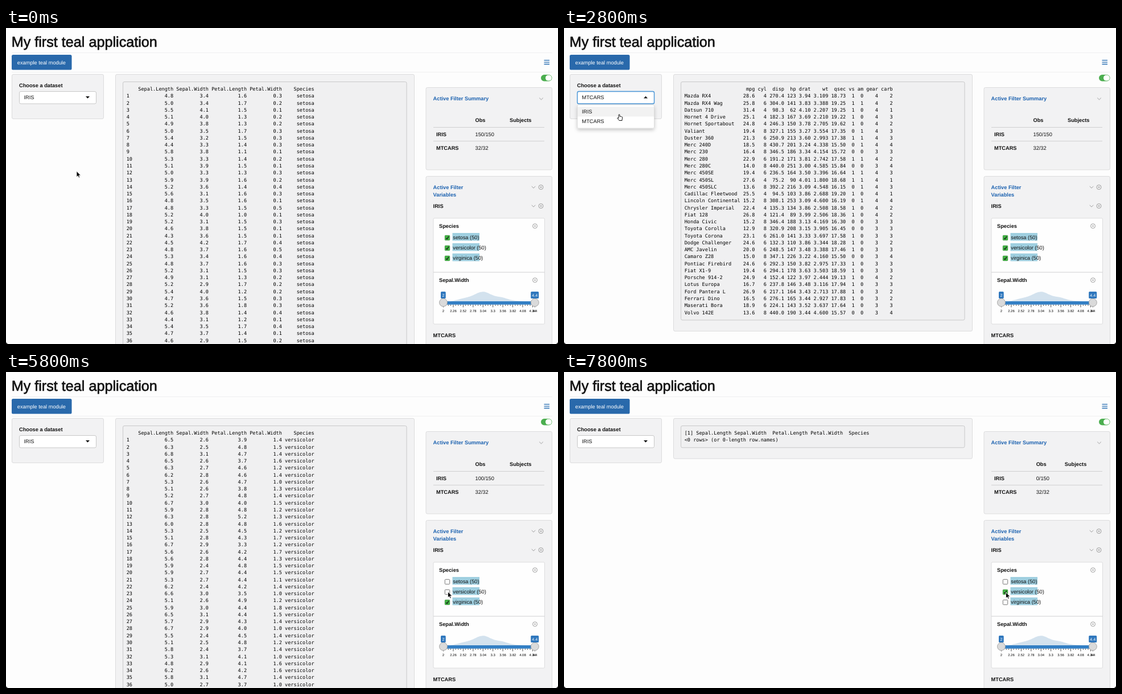
Animation of 970 by 555 pixels, one loop 8000 ms. Source, as an HTML page:

```html
<!DOCTYPE html>
<html lang="en">
<head>
<meta charset="utf-8">
<title>My first teal application</title>
<style>
html, body { margin: 0; width: 100%; height: 100%; overflow: hidden; background: #fdfdfd; }
svg { display: block; width: 970px; height: 555px; }
text { font: 9.24px "Liberation Sans", Arial, sans-serif; fill: #111; white-space: pre; text-rendering: geometricPrecision; }
.title { font-size: 25.2px; stroke: #111; stroke-width: .65px; }
.bold { font-weight: bold; }
.blue { font-weight: bold; fill: #1c62b0; }
.white { fill: #fff; }
.mono text { font: 8.577px "DejaVu Sans Mono", monospace; fill: #000; }
.scale text { font-size: 5.94px; text-anchor: middle; fill: #000; }
.bubble text { font-size: 7px; text-anchor: middle; fill: #fff; }
.panel { fill: #f2f2f3; stroke: #dcdcdd; }
.rule { stroke: #d0d0d1; }
.icon { fill: none; stroke: #888; stroke-width: .8; }
</style>
</head>
<body>
<svg viewBox="0 0 970 555">
  <defs>
    <path id="chevron" class="icon" d="M-3.3-1.6 0 1.6 3.3-1.6"/>
    <g id="close" class="icon"><circle r="4"/><path d="M-1.5-1.5 1.5 1.5M1.5-1.5-1.5 1.5"/></g>
    <filter id="shadow" x="-10%" y="-20%" width="120%" height="150%">
      <feDropShadow dx="0" dy="3" stdDeviation="3" flood-opacity=".22"/>
    </filter>
  </defs>
  <rect width="970" height="555" fill="#fdfdfd"/>
  <text class="title" x="9.7" y="32.6">My first teal application</text>
  <path d="M10 43.5H960M10 77.5H960" stroke="#efeff0"/>
  <rect x="10" y="47" width="105.5" height="26.5" rx="2.6" fill="#2969ab"/>
  <text class="white" x="19.8" y="63.8">example teal module</text>
  <path d="M945.5 56.7H955M945.5 60.1H955M945.5 63.5H955" stroke="#2069b0" stroke-width="1.3"/>

  <rect class="panel" x="10.5" y="81.5" width="161" height="78" rx="2.5"/>
  <text class="bold" x="23" y="104.2">Choose a dataset</text>
  <rect id="glow" x="22.5" y="110.5" width="137" height="23.5" rx="3.5" fill="#c3ddf3"/>
  <rect id="select" x="23.5" y="111.5" width="135" height="21.5" rx="2.5" fill="#fff"/>
  <text id="choice" x="31.5" y="125.2"></text>
  <path id="caret" fill="#111"/>

  <rect class="panel" id="outer" x="192.5" y="81.5" width="525" rx="2.5"/>
  <rect id="inner" x="205.5" y="94.5" width="498.5" rx="2.5" fill="#f0f0f1" stroke="#c8c8c9"/>
  <g class="mono" id="tables"></g>

  <g id="menu">
    <rect x="23.5" y="135" width="135" height="41" rx="2" fill="#fff" stroke="#d5d5d5" stroke-width=".7" filter="url(#shadow)"/>
    <rect id="hover" x="24" width="134" height="17" fill="#f2f2f2"/>
    <text x="31.5" y="150.2">IRIS</text>
    <text x="31.5" y="167.4">MTCARS</text>
  </g>

  <rect x="940" y="82" width="19.5" height="11.4" rx="5.7" fill="#4bae4f"/>
  <rect x="948" y="82.8" width="10.8" height="9.8" rx="4.9" fill="#fff"/>

  <rect class="panel" x="738" y="104.5" width="221.5" height="144.5" rx="2.5"/>
  <text class="blue" x="750.6" y="127.4">Active Filter Summary</text>
  <use href="#chevron" x="940.5" y="124.3"/>
  <path class="rule" d="M751 174.5H946M751 198.7H946"/>
  <text class="bold" id="obsHead" y="165.4">Obs</text>
  <text class="bold" id="subjHead" y="165.4">Subjects</text>
  <text class="bold" x="756" y="190">IRIS</text>
  <text id="irisObs" y="190"></text>
  <text class="bold" x="756" y="214.4">MTCARS</text>
  <text id="carObs" y="214.4">32/32</text>

  <rect class="panel" x="738" y="260.5" width="221.5" height="310" rx="2.5"/>
  <text class="blue" x="750.6" y="282.8">Active Filter</text>
  <text class="blue" x="750.6" y="296">Variables</text>
  <use href="#chevron" x="927" y="279.6"/><use href="#close" x="940" y="279.6"/>
  <text class="bold" x="750.6" y="315.6">IRIS</text>
  <use href="#chevron" x="927" y="312.6"/><use href="#close" x="940" y="312.6"/>
  <rect x="751" y="334" width="195.5" height="186" rx="2" fill="#fefefe" stroke="#dcdcdd"/>
  <path class="rule" d="M751 429H946.5"/>
  <text class="bold" x="761" y="350.8">Species</text>
  <use href="#close" x="929.5" y="347.8"/>
  <g id="species"></g>
  <text class="bold" x="761" y="445.8">Sepal.Width</text>
  <use href="#close" x="929.5" y="442.8"/>
  <path d="M769 481C788 480 792 477 804 474.5C822 471.5 828 463.5 838 463.3C848 463.5 851 470 866 472C880 474 884 478.5 900 479.3L929 481Z" fill="#d3e2ee"/>
  <rect x="766" y="480" width="164" height="5.8" fill="#337fc4"/>
  <path id="ticks" stroke="#222" stroke-width=".8"/>
  <g class="scale" id="scale"></g>
  <g fill="#dadada" stroke="#999" stroke-width=".8"><circle cx="768.5" cy="482.2" r="7"/><circle cx="929.3" cy="482.2" r="7"/></g>
  <g class="bubble" fill="#2f77bd">
    <rect x="764" y="463" width="8.7" height="12" rx="1.5"/><text x="768.4" y="471.7">2</text>
    <rect x="922.2" y="463" width="14" height="12" rx="1.5"/><text x="929.2" y="471.7">4.4</text>
  </g>
  <text class="bold" x="750.6" y="543.4">MTCARS</text>
  <path d="M0 551Q.5 554.5 4 555H0ZM970 551Q969.5 554.5 966 555H970Z"/>

  <g id="cursor" stroke-linejoin="round">
    <path id="arrow" d="M0 0V10.2L2.4 8.1 4 11.6 5.7 10.8 4.2 7.4H7.4Z" stroke="#fff" stroke-width=".8"/>
    <path id="hand" d="M-1 5.5V1Q0-.6 1 1V4Q2 3 2.7 4.2Q3.8 3.4 4.4 4.6Q5.8 4.2 5.7 6L5 9.5V11H0L-3.3 6.8Q-3.2 5.3-1 7Z" fill="#fff" stroke="#000" stroke-width=".9"/>
    <path id="beam" d="M-2.5-4.6Q0-4.6 0-3.2Q0-4.6 2.5-4.6M0-3.2V3.2M-2.5 4.6Q0 4.6 0 3.2Q0 4.6 2.5 4.6M-1.2 1.5H1.2" fill="none" stroke="#111" stroke-width=".9"/>
  </g>
</svg>
<script>
const LOOP = 8000, LINE = 12.263, ROWS = 36;
const $ = id => document.getElementById(id);
const set = (node, attrs) => { for (const k in attrs) node.setAttribute(k, attrs[k]); return node; };
const add = (parent, tag, attrs, content = '') => {
  const node = set(document.createElementNS('http://www.w3.org/2000/svg', tag), attrs);
  node.textContent = content;
  return parent.appendChild(node);
};
const show = (node, on) => { node.style.display = on ? '' : 'none'; };
const clamp = (v, lo, hi) => Math.min(hi, Math.max(lo, v));

let seed = 7;
const random = () => (seed = seed * 16807 % 2147483647) / 2147483647;
const normal = () => (random() + random() + random() - 1.5) * 2;

// Right-aligns every column to its widest cell, as R prints a data frame.
function printFrame(header, rows, nameWidth, lastWidth = 0) {
  const lines = [['', ...header.split(' ')], ...rows];
  const widths = lines[0].map((_, c) => Math.max(...lines.map(line => line[c].length)));
  widths[widths.length - 1] = Math.max(widths.at(-1), lastWidth);
  return lines.map(line => line.map((cell, c) => c ? cell.padStart(widths[c]) : cell.padEnd(nameWidth)).join(' '));
}

// Measurements scatter around the mean of the species.
function iris(species, nameWidth, lastWidth, means, spreads) {
  const rows = Array.from({ length: ROWS }, (_, i) => [
    String(i + 1),
    ...means.map((mean, c) => Math.max(.1, mean + spreads[c] * normal()).toFixed(1)),
    species
  ]);
  return printFrame('Sepal.Length Sepal.Width Petal.Length Petal.Width Species', rows, nameWidth, lastWidth);
}

const carNames = `Mazda RX4,Mazda RX4 Wag,Datsun 710,Hornet 4 Drive,Hornet Sportabout,Valiant,Duster 360,Merc 240D,
Merc 230,Merc 280,Merc 280C,Merc 450SE,Merc 450SL,Merc 450SLC,Cadillac Fleetwood,Lincoln Continental,
Chrysler Imperial,Fiat 128,Honda Civic,Toyota Corolla,Toyota Corona,Dodge Challenger,AMC Javelin,Camaro Z28,
Pontiac Firebird,Fiat X1-9,Porsche 914-2,Lotus Europa,Ford Pantera L,Ferrari Dino,Maserati Bora,Volvo 142E`.split(/,\s*/);

// Every figure follows the size of the engine, with some scatter.
function car(name) {
  const size = random();
  const between = (small, large, digits) => (small + (large - small) * clamp(size + normal() * .12, 0, 1)).toFixed(digits);
  const cyl = 4 + 2 * Math.floor(size * 3), manual = random() < .4;
  return [name, between(32, 12, 1), String(cyl), between(75, 440, 1), between(62, 260, 0), between(4.2, 3, 2),
    between(1.8, 4.6, 3), between(20, 15.5, 2), cyl < 8 ? '1' : '0', manual ? '1' : '0',
    manual || cyl < 6 ? '4' : '3', between(1, 4, 0)];
}

const frames = {
  setosa: iris('setosa', 3, 10, [5, 3.45, 1.46, .25], [.35, .38, .17, .1]),
  versicolor: iris('versicolor', 3, 10, [5.9, 2.8, 4.3, 1.3], [.5, .3, .45, .2]),
  virginica: iris('virginica', 2, 9, [6.6, 2.95, 5.6, 2], [.6, .3, .55, .27]),
  cars: printFrame('mpg cyl disp hp drat wt qsec vs am gear carb', carNames.map(car), 19),
  empty: ['[1] Sepal.Length Sepal.Width  Petal.Length Petal.Width  Species', '<0 rows> (or 0-length row.names)']
};
const tables = {};
for (const name in frames) {
  tables[name] = add($('tables'), 'g', {});
  frames[name].forEach((line, i) => add(tables[name], 'text', { x: 211.7, y: 110.1 + i * LINE }, line));
}

const checks = ['setosa', 'versicolor', 'virginica'].map((name, i) => {
  const y = 368.5 + 18 * i, box = $('species');
  add(box, 'rect', { x: 784.5, y: y - 8.5, width: 47.5, height: 13.5, fill: '#9fcfe0' });
  add(box, 'text', { x: 785.3, y: y + 2.7 }, name + ' (50)');
  add(box, 'rect', { x: 771.3, y: y - 4.2, width: 8.4, height: 8.4, rx: 1.3, fill: '#fff', stroke: '#555', 'stroke-width': .8 });
  const mark = add(box, 'g', {});
  add(mark, 'rect', { x: 771, y: y - 4.5, width: 9, height: 9, rx: 1.5, fill: '#43b045' });
  add(mark, 'path', { d: `M773.2 ${y + .3}l1.7 2 3-4.6`, fill: 'none', stroke: '#111', 'stroke-width': 1.2 });
  return mark;
});

const STEP = 17.43;
let tickPath = 'M929.3 486v4.5';
for (let i = 0; i <= 36; i++) tickPath += `M${768.5 + i * STEP / 4} 486v${i % 4 ? 2 : 4.5}`;
set($('ticks'), { d: tickPath });
for (let i = 0; i < 10; i++) add($('scale'), 'text', { x: 768.5 + i * STEP, y: 498.7 }, String(+(2 + i * .26).toFixed(2)));
add($('scale'), 'text', { x: 929.3, y: 498.7 }, '4.4');

const moves = [
  { from: 200, to: 700, x: 92, y: 123 },
  { from: 900, to: 1200, x: 95, y: 162 },
  { from: 1350, to: 1600, x: 95, y: 142 },
  { from: 1600, to: 2100, x: 95, y: 124 },
  { from: 2400, to: 2700, x: 97, y: 151.5 },
  { from: 2950, to: 3400, x: 438.5, y: 270 },
  { from: 3700, to: 4700, x: 776, y: 368.5 },
  { from: 5300, to: 5600, x: 776.5, y: 386 },
  { from: 5900, to: 6200, x: 776.5, y: 397 },
  { from: 6200, to: 6400, x: 776.5, y: 403 },
  { from: 6900, to: 7400, x: 776.5, y: 387 }
];
function pointer(t) {
  let x = 124, y = 251.5;
  for (const move of moves) {
    const p = clamp((t - move.from) / (move.to - move.from), 0, 1), ease = p * p * (3 - 2 * p);
    x += (move.x - x) * ease;
    y += (move.y - y) * ease;
  }
  return [x, y];
}
const within = (t, from, to) => t >= from && t < to;

function draw(t) {
  const [x, y] = pointer(t);
  const open = within(t, 800, 1400) || within(t, 2400, 3000);
  const choice = within(t, 1400, 3000) ? 'MTCARS' : 'IRIS';
  const table = within(t, 1800, 3200) ? 'cars' : t < 5600 ? 'setosa' : t < 6100 ? 'versicolor' : t < 6800 ? 'virginica' : 'empty';
  const obs = { versicolor: 100, virginica: 50, empty: 0 }[table] ?? 150;
  const shift = 2.6 * (3 - String(obs).length);

  $('choice').textContent = choice;
  show($('glow'), open);
  set($('select'), { stroke: open ? '#4f98d6' : '#c8c8c8', 'stroke-width': open ? 1.4 : 1 });
  set($('caret'), { d: open ? 'M140 123.5H147L143.5 119.7Z' : 'M140 120H147L143.5 123.8Z' });
  show($('menu'), open);
  const onCars = y > 137 ? y > 155.5 : choice === 'MTCARS';
  set($('hover'), { y: onCars ? 155.5 : 138.5 });

  for (const name in tables) show(tables[name], name === table);
  const height = frames[table].length * LINE + 13.8;
  set($('inner'), { height });
  set($('outer'), { height: height + 32.4 });

  $('irisObs').textContent = obs + '/150';
  for (const id of ['obsHead', 'irisObs', 'carObs']) set($(id), { x: 824.5 + shift });
  set($('subjHead'), { x: 885 - shift });
  [t < 5050, t < 5750 || t >= 7600, t < 6450].forEach((on, i) => show(checks[i], on));

  const hand = open && y > 137, beam = !hand && x > 205 && x < 704;
  set($('cursor'), { transform: `translate(${x} ${y})` });
  show($('hand'), hand);
  show($('beam'), beam);
  show($('arrow'), !hand && !beam);
}
function tick() {
  draw(performance.now() % LOOP);
  requestAnimationFrame(tick);
}
tick();
</script>
</body>
</html>
```
